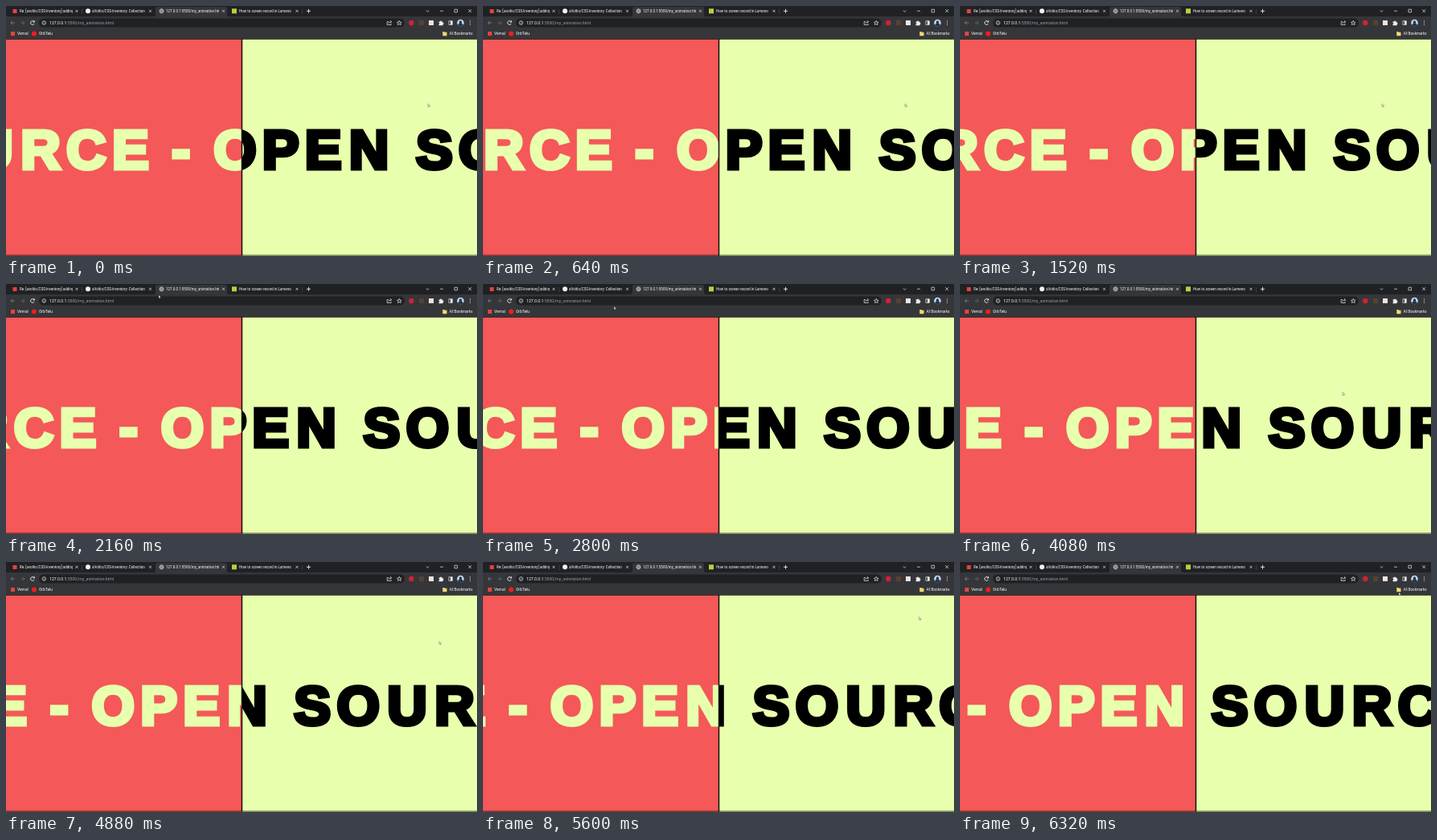
Write an HTML page that moves like this. It is 586x312 px and loops after 6.4 s.

```html
<!DOCTYPE html>
<html lang="en">
<head>
<meta charset="utf-8">
<title>Split marquee</title>
<style>
html, body { margin: 0; width: 100%; height: 100%; overflow: hidden; background: #202124; }
svg { display: block; width: 586px; height: 312px; }
.ui { font: 4.5px Roboto, "Open Sans", sans-serif; fill: #fff; }
.url { font-size: 5.15px; }
.mark { font-size: 4.9px; }
.dim { fill: #9aa0a6; }
.icon { fill: none; stroke: #eceef0; stroke-width: .7; }
.headline {
  font: bold 68.7px "Liberation Sans", Arial, sans-serif;
  text-anchor: middle;
  white-space: pre;
  stroke-width: 5.1;
  stroke-linejoin: miter;
}
.lime { fill: #e8ffad; stroke: #e8ffad; }
.black { fill: #000; stroke: #000; }
</style>
</head>
<body>
<svg viewBox="0 0 586 312">
  <defs>
    <clipPath id="leftHalf"><path d="M0 41H293.5V311H0z"/></clipPath>
    <clipPath id="rightHalf"><path d="M293.5 41H586V311H293.5z"/></clipPath>
    <clipPath id="tab1"><path d="M17 0H83V13H17z"/></clipPath>
    <clipPath id="tab2"><path d="M107 0H173V13H107z"/></clipPath>
    <clipPath id="tab3"><path d="M199 0H265V13H199z"/></clipPath>
    <clipPath id="tab4"><path d="M290 0H355V13H290z"/></clipPath>
  </defs>

  <!-- Page -->
  <path fill="#f45858" d="M0 41H293.5V312H0z"/>
  <path fill="#e8ffad" d="M293.5 41H586V312H293.5z"/>
  <g clip-path="url(#leftHalf)"><text class="headline lime" y="202.7"></text></g>
  <g clip-path="url(#rightHalf)"><text class="headline black" y="202.7"></text></g>
  <path fill="none" stroke="#111" stroke-width=".8" d="M0 41.400H586M0 311.100H586"/>
  <path stroke="#111" stroke-width="1.500" d="M293.500 41V311.500"/>

  <!-- Tab strip -->
  <path fill="#202124" d="M0 0H586V13H0z"/>
  <path fill="#35363a" d="M184 13q2 0 2-2V3q0-2 2-2h85q2 0 2 2v8q0 2 2 2z"/>
  <path fill="#55585c" d="M94 4h.5v6H94zM368 4h.5v6h-.5z"/>
  <g class="ui">
    <text x="17" y="8" clip-path="url(#tab1)">Re: [avoltis/CSS-Inventory] adding</text>
    <text x="107" y="8" clip-path="url(#tab2)">aVoltis/CSS-Inventory: Collection</text>
    <text x="199" y="8" clip-path="url(#tab3)">127.0.0.1:5500/my_animation.html</text>
    <text x="290" y="8" clip-path="url(#tab4)">How to screen record in Lumenos</text>
  </g>
  <rect x="8.500" y="4" width="5" height="5" fill="#e5443a"/>
  <circle cx="102" cy="6.300" r="3" fill="#f4f4f4"/>
  <g class="icon">
    <circle cx="193.500" cy="6.300" r="2.500"/>
    <path d="M191 6.300h5M193.500 3.800q-2 2.500 0 5q2-2.500 0-5" stroke-width=".5"/>
  </g>
  <rect x="281" y="3.300" width="6" height="6" fill="#b9cf3f"/>
  <g class="icon" id="closers"></g>
  <g class="icon">
    <path d="M374 6.300h5M376.500 3.800v5" stroke-width=".9"/>
    <path d="M522.700 5.500l1.800 1.700 1.800-1.700M540 6.200h4M558 4.200h3.600v3.600H558zM575.300 4.200l3.800 3.800M579.100 4.200l-3.800 3.800"/>
  </g>

  <!-- Toolbar -->
  <path fill="#35363a" d="M0 13H586V41H0z"/>
  <rect x="41" y="15.500" width="455" height="11" rx="5.500" fill="#202124"/>
  <g class="icon">
    <path stroke="#8b8e92" d="M11 21H6M8.300 18.700L6 21l2.300 2.300"/>
    <path stroke="#6f7276" d="M18 21h5M20.700 18.700L23 21l-2.300 2.300"/>
    <path stroke-width=".9" d="M35 19.600a2.400 2.400 0 1 0 .2 2.400M35.400 18.200v1.900h-1.900"/>
    <circle cx="47.300" cy="21" r="2.300"/>
    <path d="M47.300 20.700v1.600M47.300 19.500v.6"/>
    <path d="M476 19.500h-1.800v4h5v-1.300M475.800 22q.2-2.200 3.700-2.200M478 18.200l1.700 1.600-1.700 1.600"/>
    <path d="M489.300 18.300l.8 1.900 2 .1-1.500 1.300.5 2-1.800-1.100-1.800 1.100.5-2-1.500-1.300 2-.1z"/>
    <rect x="551" y="18.800" width="4.500" height="4.500"/>
    <path d="M554 18.800v4.500" stroke-width="2"/>
  </g>
  <text class="ui url" x="54" y="22.900">127.0.0.1<tspan class="dim">:5500/my_animation.html</tspan></text>
  <circle cx="504.300" cy="21" r="3.200" fill="#cf2434"/>
  <rect x="514" y="18" width="6" height="6" fill="#59412f"/>
  <rect x="526" y="18" width="6" height="6" fill="#efe4e2"/>
  <path fill="#eceef0" d="M538.500 19.500h1.500a1 1 0 0 1 2 0h1.500v1.600a1 1 0 0 1 0 2v1.200h-5v-1.600a.9.900 0 0 0 0-1.800z"/>
  <circle cx="565.500" cy="21" r="4.300" fill="#c9d7ef"/>
  <path fill="#27364e" d="M562.200 23.800q.4-2 2.100-2.200a1.800 1.800 0 1 1 2.400 0q1.700.2 2.100 2.200a4.300 4.300 0 0 1-6.600 0z"/>
  <path fill="#dfe1e5" d="M577 18.300h1v1h-1zM577 20.500h1v1h-1zM577 22.700h1v1h-1z"/>

  <!-- Bookmarks -->
  <rect x="6" y="32" width="5" height="5" fill="#e5443a"/>
  <circle cx="35" cy="34.500" r="3" fill="#f21d1d"/>
  <path fill="#f7d774" d="M543.300 32h2l.7.800h2.500v4.400h-5.200z"/>
  <g class="ui">
    <text class="mark" x="14" y="36.300">Vemal</text>
    <text class="mark" x="41" y="36.300">OrbTelu</text>
    <text x="551.500" y="36.300">All Bookmarks</text>
  </g>

  <path id="cursor" d="M0 0v3.700l.9-.8.6 1.300.6-.3-.6-1.300h1.200z" fill="#fff" stroke="#333" stroke-width=".35"/>
</svg>
<script>
const LOOP = 6400, STEP = 80;
const EM = 73.2;
const PHRASE = "SOURCE - OPEN SOURCE - OPEN";
const ADVANCE = { S: .722, O: .833, U: .833, R: .778, C: .778, E: .722, P: .722, N: .833, "-": .333, " ": .333 };

// [time, value...] rows, joined by straight moves
const SCROLL = [[0, -160.3], [640, -177.5], [6320, -357.5], [6400, -360]];
const POINTER = [
  [0, 525, 122], [1520, 525, 122], [2160, 190, 14], [2800, 163, 28],
  [3040, 170, 18], [4080, 476, 135], [4880, 539, 99], [6320, 546, 38], [6400, 546, 38]
];

function sample(rows, t) {
  const i = rows.findIndex(row => row[0] > t);
  const a = rows[i - 1], b = rows[i];
  const k = (t - a[0]) / (b[0] - a[0]);
  return a.slice(1).map((v, n) => v + (b[n + 1] - v) * k);
}

const centers = [];
let pen = 0;
for (const ch of PHRASE) {
  const w = ADVANCE[ch] * EM;
  centers.push((pen + w / 2).toFixed(2));
  pen += w;
}

const lines = [...document.querySelectorAll(".headline")];
for (const line of lines) {
  line.textContent = PHRASE;
  line.setAttribute("x", centers.join(" "));
}

document.getElementById("closers").innerHTML = [88, 179.5, 270.5, 362]
  .map(x => `<path d="M${x - 1.5} 4.8l3 3m0-3l-3 3"/>`).join("");

const cursor = document.getElementById("cursor");

function draw(now) {
  const t = Math.floor((now % LOOP) / STEP) * STEP;
  const [x] = sample(SCROLL, t);
  for (const line of lines) line.setAttribute("transform", `translate(${x.toFixed(2)} 0)`);
  cursor.setAttribute("transform", `translate(${sample(POINTER, t).join(" ")})`);
}

const start = performance.now();
function tick() {
  draw(performance.now() - start);
  requestAnimationFrame(tick);
}
tick();
</script>
</body>
</html>
```
